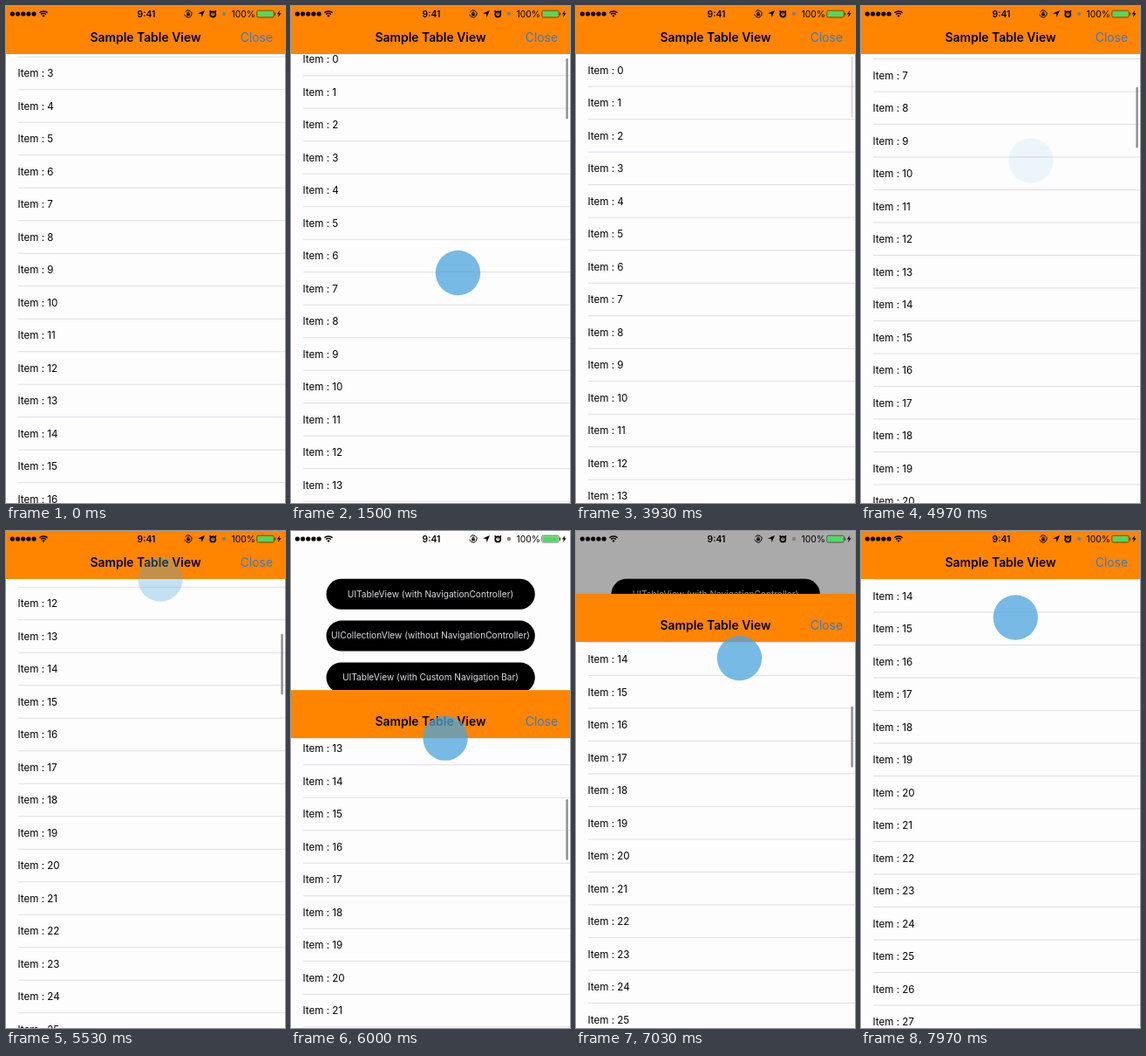
An HTML page with a canvas for the animation above (8000 ms loop, 320 px wide and 569 px high).

```html
<!DOCTYPE html>
<html lang="en">
<head>
<meta charset="utf-8">
<title>Sample Table View</title>
<style>
html, body { margin: 0; width: 100%; height: 100%; overflow: hidden; background: #fdfdfd; }
canvas { display: block; width: 320px; height: 569px; }
</style>
</head>
<body>
<canvas id="stage"></canvas>
<script>
const W = 320, H = 569, LOOP = 8000;
const BAR = 55, ROW = 37.5, ROWS = 100;
const PAPER = '#fdfdfd', ORANGE = '#ff8500', LINE = '#dedee6';
const FONT = 'Inter, Roboto, sans-serif';
const MENU = [
  'UITableView (with NavigationController)',
  'UICollectionVIew (without NavigationController)',
  'UITableView (with Custom Navigation Bar)'
];

const canvas = document.getElementById('stage');
const c = canvas.getContext('2d');
const dpr = window.devicePixelRatio || 1;
canvas.width = W * dpr;
canvas.height = H * dpr;

const clamp = x => Math.max(0, Math.min(1, x));
const ramp = (t, from, to) => clamp((t - from) / (to - from));
function ease(t, from, to) {
  const u = ramp(t, from, to);
  return u * u * (3 - 2 * u);
}
// Rises from a to b and falls back from b to d.
const swing = (t, a, b, d) => ease(t, a, b) * (1 - ease(t, b, d));
// Fades in at a and out at b.
const shown = (t, a, b, out) => ease(t, a, a + 90) * (1 - ease(t, b, b + out));

// Drag back to the top, later a flick that glides out.
const FLICK = 4380, RELEASE = 4880, PUSH = 202;
function scrollAt(t) {
  if (t < FLICK) return 109 * (1 - ease(t, 870, 1670));
  if (t < RELEASE) return PUSH * ramp(t, FLICK, RELEASE) ** 1.63;
  return Math.min(524.2, PUSH + 326 * (1 - Math.exp((RELEASE - t) / 495)));
}

const sheetY = t => 168 * swing(t, 2120, 2600, 3850) + 271 * swing(t, 5600, 6250, 7430);

// Each touch: when it lands and lifts, when the scroll thumb hides, where it is.
const touches = [
  { down: 760, up: 1700, hide: 1700, at: (t, scroll) => [191.5, 318 - scroll] },
  { down: 2070, up: 3800, hide: 3800, at: (t, scroll, top) => [165, 182 + top] },
  { down: 4290, up: 4870, hide: 7100, at: (t, scroll) => [195, 379 - Math.min(scroll, PUSH)] },
  {
    down: 5490, up: LOOP, hide: 0,
    at: (t, scroll, top) => [
      177 + 10.5 * Math.max(0, Math.sin(Math.PI * (t - 6000) / 1985)),
      top + 55 + 44 * ease(t, 6250, LOOP)
    ]
  }
];

function rect(x, y, w, h, color) {
  c.fillStyle = color;
  c.fillRect(x, y, w, h);
}

function pill(x, y, w, h, r, color) {
  c.fillStyle = color;
  c.beginPath();
  c.roundRect(x, y, w, h, r);
  c.fill();
}

function disc(x, y, r, color) {
  c.fillStyle = color;
  c.beginPath();
  c.arc(x, y, r, 0, 7);
  c.fill();
}

function ring(x, y, r, from = 0, to = Math.PI * 2) {
  c.beginPath();
  c.arc(x, y, r, from, to);
  c.stroke();
}

function icon(path, x, y) {
  c.save();
  c.translate(x, y);
  c.fillStyle = '#000';
  c.fill(new Path2D(path));
  c.restore();
}

function label(text, x, y, size, color = '#000', align = 'left', weight = 400) {
  c.font = `${weight} ${size}px ${FONT}`;
  c.fillStyle = color;
  c.textAlign = align;
  c.fillText(text, x, y + size * 0.36);
}

function drawMenu(top) {
  rect(0, 0, W, H, PAPER);
  MENU.forEach((text, i) => {
    const y = 72 + i * 47.8;
    pill(40.5, y - 17.2, 239.3, 34.9, 17.4, '#000');
    label(text, 160, y, 10.15, '#dcdce0', 'center');
  });
  rect(0, 0, W, H, `rgba(0,0,0,${0.6 * clamp(1 - top / 160)})`);
}

function drawSheet(top, scroll, thumb) {
  c.save();
  c.translate(0, top);
  rect(0, 0, W, H, PAPER);
  const first = Math.floor(scroll / ROW);
  for (let n = first; n < Math.min(ROWS, first + 16); n++) {
    const y = BAR + n * ROW - scroll;
    label('Item : ' + n, 13.5, y + ROW / 2, 11.6);
    rect(14, y + ROW - 0.8, W - 14, 1, LINE);
  }
  const view = H - BAR, track = view - 6, share = track / (ROWS * ROW);
  c.globalAlpha = thumb;
  pill(315.4, BAR + 3 + scroll * share, 2.4, view * share, 1.2, '#8e8e92');
  c.globalAlpha = 1;
  rect(0, 0, W, BAR, ORANGE);
  label('Sample Table View', 160, 36, 13.9, '#000', 'center', 600);
  label('Close', 306, 36, 13.9, '#3a7cc4', 'right');
  c.restore();
}

function drawStatus() {
  // Signal and wireless
  for (let i = 0; i < 5; i++) disc(7.3 + i * 6.2, 9, 2.6, '#000');
  c.strokeStyle = '#000';
  c.lineWidth = 1.5;
  for (const r of [6.6, 4]) ring(43, 12.5, r, -2.35, -0.79);
  icon('M0 1L-1.7 -1Q0 -2.4 1.7 -1Z', 43, 12);
  label('9:41', 161, 9, 10.3, '#000', 'center', 600);

  // Rotation lock
  c.lineWidth = 1;
  ring(209, 9, 4.1, -2.6, 3);
  rect(207.2, 8.4, 3.6, 2.8, '#000');
  ring(209, 8.2, 1.2, Math.PI, 0);

  // Location, alarm
  icon('M4 -4L.6 4L0 0L-4 -.6Z', 224, 9);
  c.lineWidth = 1.8;
  ring(237.3, 9.4, 3);
  for (const x of [234.2, 240.4]) disc(x, 6, 0.9, '#000');
  rect(236.9, 7.4, 0.9, 2.4, '#000');
  disc(250, 9, 2.2, '#85807c');

  // Battery
  label('100%', 286, 9, 10.4, '#000', 'right');
  c.lineWidth = 0.8;
  c.strokeStyle = '#28501c';
  c.beginPath();
  c.roundRect(287.8, 5.2, 19.4, 7.8, 1.6);
  c.stroke();
  pill(288.8, 6.2, 17.4, 5.8, 0.8, '#4cd964');
  rect(308, 7.6, 1.2, 3, '#28501c');
  icon('M1 -4L-2.4 .6H-.2L-1.4 4.2L2.4 -.8H.2Z', 313.2, 9);
}

function draw(t) {
  const top = sheetY(t), scroll = scrollAt(t);
  const thumb = Math.max(...touches.map(k => shown(t, k.down + 90, k.hide, 200)));
  c.setTransform(dpr, 0, 0, dpr, 0, 0);
  if (top > 0) drawMenu(top);
  drawSheet(top, scroll, thumb);
  drawStatus();
  for (const k of touches) {
    c.globalAlpha = shown(t, k.down, k.up, 130);
    disc(...k.at(t, scroll, top), 25.7, 'rgba(75,165,222,0.75)');
  }
  c.globalAlpha = 1;
}

const start = performance.now();
function tick() {
  draw((performance.now() - start) % LOOP);
  requestAnimationFrame(tick);
}
tick();
</script>
</body>
</html>
```
